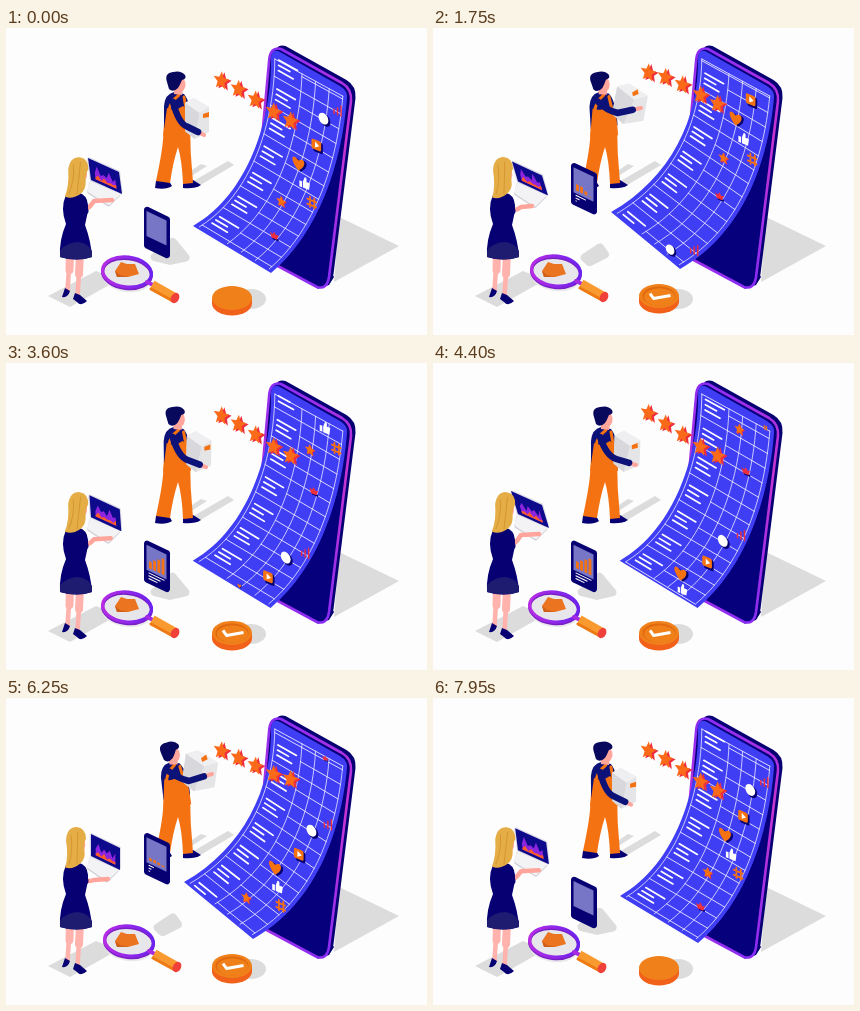
An HTML page with a canvas that plays this animation: 421x307 px, repeating every 8 s.

```html
<!DOCTYPE html>
<html lang="en">
<head>
<meta charset="utf-8">
<style>
html, body { margin: 0; width: 100%; height: 100%; overflow: hidden; background: #fefdfe; }
canvas { display: block; width: 421px; height: 307px; }
</style>
</head>
<body>
<canvas></canvas>
<script>
const W = 421, H = 307, LOOP = 8000, CYCLE = 4000;
const canvas = document.querySelector('canvas'), c = canvas.getContext('2d');
const dpr = window.devicePixelRatio || 1;
canvas.width = W * dpr;
canvas.height = H * dpr;

const NAVY = '#060073', SHIRT = '#0c1278', BLUE = '#403ef5', ORANGE = '#f57212', RED = '#ee2f3e',
  PURPLE = '#8a2be8', SKIN = '#ffa59c', GRAY = '#dcdcdc', WHITE = '#fff', PAGE = '#fefdfe';

const clamp = x => Math.max(0, Math.min(1, x));
const smooth = x => { x = clamp(x); return x * x * (3 - 2 * x); };
const mix = (a, b, k) => a + (b - a) * k;
const mixPts = (p, q, k) => p.map((v, i) => mix(v, q[i], k));

// Smooth periodic curve through six poses of the four-second cycle
const POSES = [0, 400, 1450, 1750, 2250, 2850];
function pose(t, v) {
  const at = i => POSES[(i + 6) % 6] + CYCLE * Math.floor(i / 6);
  const val = i => v[(i + 6) % 6];
  const slope = i => (val(i + 1) - val(i - 1)) / (at(i + 1) - at(i - 1));
  let i = 5;
  while (POSES[i] > t) i--;
  const d = at(i + 1) - at(i), x = (t - at(i)) / d, y = 1 - x;
  return val(i) * (1 + 2 * x) * y * y + val(i + 1) * x * x * (3 - 2 * x)
    + d * x * y * (slope(i) * y - slope(i + 1) * x);
}

function fill(color, d) { c.fillStyle = color; c.fill(new Path2D(d)); }
function stroke(color, w, d, cap = 'round') {
  c.strokeStyle = color;
  c.lineWidth = w;
  c.lineCap = cap;
  c.lineJoin = 'round';
  c.stroke(new Path2D(d));
}
const poly = (color, pts) => fill(color, 'M' + pts.join(' ') + 'Z');
function ellipse(color, x, y, rx, ry = rx, rot = 0) {
  c.fillStyle = color;
  c.beginPath();
  c.ellipse(x, y, rx, ry, rot, 0, 7);
  c.fill();
}
function rounded(color, pts, r) {
  const n = pts.length;
  c.fillStyle = color;
  c.beginPath();
  c.moveTo((pts[0] + pts[n - 2]) / 2, (pts[1] + pts[n - 1]) / 2);
  for (let i = 0; i < n; i += 2) c.arcTo(pts[i], pts[i + 1], pts[(i + 2) % n], pts[(i + 3) % n], r);
  c.closePath();
  c.fill();
}
function group(x, y, draw, rot = 0) {
  c.save();
  c.translate(x, y);
  c.rotate(rot);
  draw();
  c.restore();
}
function star(color, r, x = 0, y = 0) {
  const pts = [];
  for (let i = 0; i < 10; i++) {
    const a = i * Math.PI / 5 - Math.PI / 2, q = i % 2 ? r * .45 : r;
    pts.push(x + q * Math.cos(a), y + q * Math.sin(a));
  }
  poly(color, pts);
}

// Paper: a surface between two curves, u across and v down
const LEFT = [[265, 24, 266, 90, 243, 166, 187, 198], [265, 24, 266, 90, 238, 150, 178, 184]];
const RIGHT = [[341, 65, 336, 135, 313, 205, 265, 245], [341, 65, 335, 133, 311, 205, 247, 241]];
let left, right;
function bezier(p, v) {
  const w = 1 - v, k = [w * w * w, 3 * w * w * v, 3 * w * v * v, v * v * v];
  return [0, 1].map(a => k.reduce((sum, q, i) => sum + q * p[2 * i + a], 0));
}
function onPaper(u, v) { return mixPts(bezier(left, v), bezier(right, v), u); }
function rowLine(v, u0, u1, w) {
  if (v > .02 && v < .99) stroke(WHITE, w, 'M' + onPaper(u0, v) + 'L' + onPaper(u1, v));
}

const ICONS = [
  [.9, .1, () => [-4, 0, 4].forEach((x, i) => stroke(RED, 1.6, `M${x} 5V${[1, -2, -5][i]}`))],
  [.75, .175, () => { ellipse(NAVY, 1, 1, 6); ellipse(WHITE, -1, 0, 5.6); }],
  [.72, .31, () => {
    rounded(NAVY, [-4, -4, 7, -4, 7, 7, -4, 7], 2);
    rounded(ORANGE, [-6, -5, 5, -5, 5, 5, -6, 5], 2);
    poly(WHITE, [-2, -3, 3, 0, -2, 3]);
  }],
  [.57, .435, () => {
    const heart = 'M0 7C-11-1-7-9 0-3C7-9 11-1 0 7';
    c.translate(2, .5);
    fill(NAVY, heart);
    c.translate(-2.5, -.5);
    fill(ORANGE, heart);
  }],
  [.72, .505, () => {
    poly(WHITE, [-6, -1, -3, -1, -3, 5, -6, 5]);
    fill(WHITE, 'M-2-1L0-6Q3-7 2-2H6L5 5H-2Z');
  }],
  [.56, .645, () => { star(RED, 6, 1, .5); star(ORANGE, 6); }],
  [.89, .57, () => stroke(ORANGE, 2, 'M-2-5V5M3-5V5M-5-2H5M-5 3H5')],
  [.72, .815, () => { poly(NAVY, [-2, 2, 5, 2, 5, 4, -2, 4]); poly(RED, [-5, -2, -2, -1, 0, -4, 2, -1, 5, -2, 3, 3, -3, 3]); }]
];

function phone(t, s) {
  poly(GRAY, [333, 189, 393, 218, 328, 254]);
  const face = 'M263 34Q264 18 275 21L336 55Q346 61 345 73L323 249Q321 262 311 259L255 229Q245 222 247 208Z';
  group(4.5, -3, () => fill(NAVY, face));
  fill(NAVY, 'M311 261L323 257L328 249L323 240Z');
  const ring = c.createLinearGradient(262, 20, 340, 250);
  ring.addColorStop(0, '#8a2cf5');
  ring.addColorStop(.45, '#c835d0');
  ring.addColorStop(1, '#8a2cf5');
  fill('#06007d', face);
  stroke(ring, 2.6, face);

  left = mixPts(LEFT[0], LEFT[1], s);
  right = mixPts(RIGHT[0], RIGHT[1], s);
  const [l, r] = [left, right];
  fill(BLUE, `M${l[0]} ${l[1] + 6}Q${l[0] + 1} ${l[1] - 4} ${l[0] + 9} ${l[1]}L${r[0] - 7} ${r[1] - 7}`
    + `Q${r[0] + 1} ${r[1] - 2} ${r[0]} ${r[1] + 5}C${r.slice(2)}L${l[6]} ${l[7]}C${[4, 5, 2, 3].map(i => l[i])} ${l[0]} ${l[1] + 6}`);

  const shift = t / LOOP;
  for (const u of [.05, .41, .59, .77, .95]) {
    let d = '';
    for (let v = .025; v < .99; v += .04) d += (d ? 'L' : 'M') + onPaper(u, v);
    stroke('#e9e9ff', .8, d);
  }
  rowLine(.025, .05, .95, .8);
  for (let i = 0; i < 14; i++) {
    const v = (i / 14 + .11 - shift + 2) % 1;
    rowLine(v, i % 2 ? .41 : .05, .95, .8);
  }
  for (let i = 0; i < 7; i++)
    [.25, .15, .2].forEach((len, j) =>
      rowLine((i / 7 + .02 + j * .026 - shift + 1) % 1, .1, .1 + len, 1.7));
  for (const [u, v0, draw] of ICONS) {
    const v = (v0 - shift + 1) % 1, size = clamp(Math.min(v, 1 - v) * 20);
    c.save();
    c.translate(...onPaper(u, v));
    c.transform(size * .88, size * .36, 0, size, 0, 0);
    draw();
    c.restore();
  }
}

function ratingStars(p) {
  [[216, 53], [233, 61.5], [250, 72], [268, 84], [285, 93]].forEach(([x, y], i) => {
    const k = (p - 1200 - 160 * i) / 1070;
    const lift = Math.abs(k) < 1 ? 17 * Math.cos(k * Math.PI / 2) ** 2 : 0;
    c.save();
    c.translate(x, y - lift);
    c.transform(.85, .22, -.08, 1, 0, 0);
    star(RED, 9.5, 2, .3);
    star('#fb6a18', 9.5, -1, 0);
    c.restore();
  });
}

function man(p) {
  poly(GRAY, [184, 155, 222, 133, 228, 137, 191, 159]);
  poly(GRAY, [177, 148, 195, 136, 201, 138, 184, 149]);
  fill(NAVY, 'M150 153L163 153L166 158Q160 162 149 160Z');
  fill(NAVY, 'M177 153L187 152L195 157Q189 161 177 160Z');
  fill(ORANGE, 'M158 95L184 95Q184 125 187 155L177 156Q176 132 172 119Q167 134 164 155L150 153Q156 125 157 112Z');

  const lean = pose(p, [0, 0, -2, -3, -6, -2.5]) / 52;
  group(170, 105, () => {
    c.translate(-170, -105);
    fill(SHIRT, 'M158 78Q159 66 168 64L178 66Q185 74 185 98L158 100Z');
    fill(ORANGE, 'M157 108L161 80Q169 84 177 78L184 84L185 108Z');
    stroke(ORANGE, 3, 'M163 83Q164 74 173 67M178 69L181 86');
    fill(SKIN, 'M168 58L177 60L176 67L168 66Z');
    ellipse(SKIN, 174, 56.5, 5.5, 7.5);
    fill('#08085c', 'M161 54Q158 45 167 44Q175 42 179 47Q181 51 176 52Q174 57 172 60Q167 65 163 61Z');
  }, lean);

  const bx = pose(p, [191, 194, 199, 197, 194, 197]), by = pose(p, [91, 89, 82, 77, 74, 84]);
  const w = pose(p, [12, 13, 16, 16, 16.5, 14]), turn = pose(p, [0, .04, .14, .18, .14, .1]);
  group(bx, by, () => {
    poly('#e5e5e7', [-w, -16, -w * .3, -21, w, -12, w, 13, -w * .2, 20, -w, 12]);
    poly('#efeff1', [-w, -16, -w * .3, -21, w, -12, w * .2, -6]);
    poly('#d8d8dc', [-w, -16, w * .2, -6, -w * .2, 20, -w, 12]);
    // The label slides from the side to the top as the box tips
    const k = (w - 12) / 4;
    group(9 - 6 * k, -4 - 9 * k, () => poly(ORANGE, [-3, -1, 3, -3, 3, 2, -3, 3]), -.4 * k);
  }, turn);

  const hx = pose(p, [198, 203, 212, 208, 206, 206]), hy = pose(p, [107, 102, 87, 80, 76, 94]);
  const sx = 167 + lean * 28, ex = mix(sx, hx, .45), ey = mix(76, hy, .5) + 7;
  const wx = mix(ex, hx, .65), wy = mix(ey, hy, .65);
  stroke(SKIN, 4, `M${wx} ${wy}L${hx} ${hy}`);
  stroke(SHIRT, 6.5, `M${sx} 74Q${mix(sx, ex, .4)} ${ey - 3} ${ex} ${ey}L${wx} ${wy}`);
}

function laptop(t, p) {
  const drop = pose(p, [0, -1, 2, 1.5, 6, 6]), tilt = pose(p, [-3, -7, -6, -6, 0, 0]);
  const high = pose(p, [22, 23, 20, 20, 22, 22]), span = pose(p, [31, 31, 30, 30, 29, 29]);
  const x = 85, y = 152 + drop, top = [x + tilt, y - high];
  rounded('#cfcfd6', [x - 4, y + 13, x - 1, y, x + span, y + 14, x + span - 13, y + 27], 2);
  rounded('#f3f3f5', [x - 4, y + 11.5, x, y - 1, x + span, y + 13, x + span - 13, y + 25.5], 2);
  rounded('#dddce6', [top[0] - 1.5, top[1] - 2, top[0] + span + 1, top[1] + 13, x + span + 1, y + 15, x - 1, y + 1], 2);
  c.save();
  c.transform(span / 31, 14 / 31, -tilt / high, 1, x, y);
  c.fillStyle = '#0e0a8c';
  c.fillRect(0, -high, 31, high);
  const wave = (i, f) => Math.sin(t * Math.PI / 1000 + i * f);
  const area = (color, base, amp, f) => {
    const pts = [5, -3];
    for (let i = 0; i < 8; i++) pts.push(5 + i * 3, -base - amp * (i % 2 ? 1 : .4) * (1 + .35 * wave(i, f)));
    poly(color, pts.concat(26, -3));
  };
  area('#8d25df', 6, 8, 1.7);
  area('#ff5b26', 3, 4, 2.3);
  c.restore();
}

function woman(t, p, s) {
  poly(GRAY, [42, 268, 90, 243, 112, 252, 64, 279]);
  stroke('#ffb3ac', 8, 'M64 225L63.5 242M74 225L73 246');
  stroke('#ffb3ac', 4.6, 'M63 240L61.5 263M73 244L71.5 268');
  fill(NAVY, 'M59 260L64 263Q62 270 56 269ZM69 265L74 267L81 273Q75 279 71 274L67 271Z');
  laptop(t, p);
  const hx = pose(p, [106, 106, 101, 99, 102, 102]), hy = pose(p, [172, 171, 178, 178, 181, 181]);
  stroke(SKIN, 4.5, `M78 178Q80 185 88 ${hy + 1}L${hx} ${hy}`);
  fill(NAVY, 'M60 167Q66 162 76 166Q83 170 82 183L79 197Q85 213 86 229Q71 234 54 229Q53 212 60 196Q54 180 60 167');
  fill('#1d1c70', 'M54 222Q62 214 72 214Q82 215 86 223V229Q71 234 54 229Z');
  stroke(NAVY, 7, 'M77 173L79 183');
  group(70, 166, () => {
    fill(SKIN, 'M2-28Q11-29 10-18Q8-9 2-12Z');
    fill('#e5ad45', 'M-9-24Q-8-37 2-37Q11-36 11-25Q8-20 9-13Q10-5 4 0Q-4 6-11 3Q-7-8-9-24');
    stroke('#d1902f', .8, 'M-4-29Q-2-14-7 0M3-32Q2-15 1 0');
  }, .05 - .09 * s);
}

function tablet(t, s) {
  rounded(GRAY, mixPts([140, 231, 167, 208, 187, 232, 164, 237], [145, 229, 168, 214, 178, 228, 156, 239], s), 4);
  group(138, 178 - 44 * s, () => {
    rounded(NAVY, [0, -1, 26, 11.5, 26, 54, 0, 41.5], 3);
    c.transform(1, .48, 0, 1, 2.5, 5);
    c.fillStyle = '#7775c5';
    c.fillRect(0, 0, 20, 25);
    const grow = i => smooth((t - 1000 - i * 220) / 900) * (1 - smooth((t - 5450 + i * 130) / 1450));
    [7, 10, 13, 16].forEach((h, i) => {
      c.fillStyle = ORANGE;
      c.fillRect(2.5 + i * 4.2, 22, 2.8, -h * grow(i));
    });
    for (let i = 0; i < 3; i++) {
      const g = grow(i + 1);
      if (g > .02) stroke(WHITE, 1.1, `M2.5 ${27 + i * 2.8}H${2.5 + [15, 11, 8][i] * g}`);
    }
  });
}

function magnifier(s) {
  group(121 + 2 * s, 244 - s, () => {
    ellipse('#e9e9eb', 0, 5, 25, 15, .12);
    ellipse('#e7e6ea', 0, 0, 24, 14.5, .12);
    const rim = c.createLinearGradient(-26, 0, 26, 0);
    rim.addColorStop(0, '#b92de4');
    rim.addColorStop(1, '#6922ef');
    c.lineWidth = 3.2;
    for (const [color, dy] of [['#7a1fc4', 1.5], [rim, 0]]) {
      c.strokeStyle = color;
      c.beginPath();
      c.ellipse(0, dy, 24.5, 15, .12, 0, 7);
      c.stroke();
    }
    stroke('#a62be2', 4, 'M20 10L26 13');
    stroke('#f99a31', 10, 'M25 13L48 26', 'butt');
    stroke('#ee7a14', 3, 'M24 17L45 28.5');
    ellipse('#f0403a', 48, 26, 4, 5.5, .5);
  });
  fill('#ea7420', 'M109 243L115 234L121 236L129 236L133 246L122 249L111 249Z');
  fill('#cf5f18', 'M109 243L111 249L122 249L114 247Z');
}

function coin(t, s) {
  ellipse(GRAY, 245, 271, 15, 10);
  group(226, 271 - 2 * s, () => {
    ellipse('#f2611a', 0, 4.5, 20, 12);
    c.fillStyle = '#f2611a';
    c.fillRect(-20, 0, 40, 4.5);
    ellipse('#f0801a', 0, -1, 20, 12);
    const drawn = smooth((t - 600) / 600) * (1 - smooth((t - 7000) / 600));
    if (!drawn) return;
    c.globalAlpha = drawn;
    ellipse('#e0680f', 0, -1, 16.5, 9.5);
    ellipse('#f0801a', .5, 0, 15.5, 8.7);
    c.globalAlpha = 1;
    const a = clamp(drawn * 3), b = clamp(drawn * 1.5 - .5);
    stroke(WHITE, 3, `M-9-3.5L${-9 + 3.5 * a} ${-3.5 + 5 * a}` + (b ? `L${-5.5 + 17 * b} ${1.5 - 3 * b}` : ''), 'butt');
  });
}

function frame(now) {
  const t = Math.floor(now % LOOP / 50) * 50, p = t % CYCLE;
  const s = smooth((1 - Math.cos(p / CYCLE * 2 * Math.PI)) / 2);
  c.setTransform(dpr, 0, 0, dpr, 0, 0);
  c.fillStyle = PAGE;
  c.fillRect(0, 0, W, H);
  phone(t, s);
  ratingStars(p);
  man(p);
  woman(t, p, s);
  tablet(t, s);
  magnifier(s);
  coin(t, s);
  requestAnimationFrame(frame);
}
frame(0);
</script>
</body>
</html>
```
